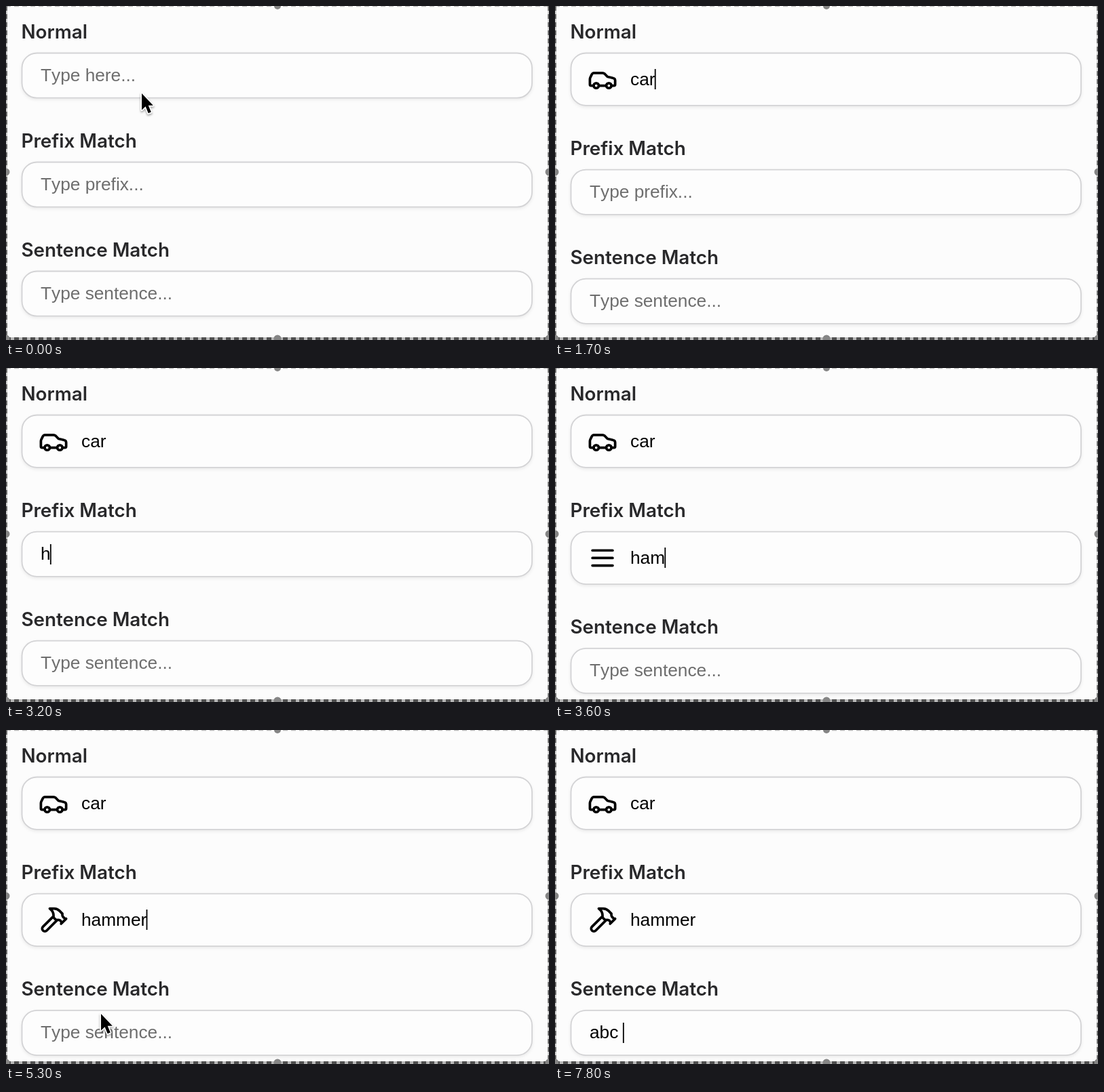
Animation, 800 px wide and 493 px high, one loop 8000 ms. Source, as an HTML page:

```html
<!DOCTYPE html>
<html lang="en">
<head>
<meta charset="utf-8">
<title>Icon inputs</title>
<style>
html, body { margin: 0; width: 100%; height: 100%; overflow: hidden; background: #fcfcfc; }
svg { display: block; width: 800px; height: 493px; }
.label { font: 600 27.8px Inter, "Open Sans", sans-serif; fill: #29292b; }
.value { font: 26.25px "Liberation Sans", Arial, sans-serif; font-kerning: none; white-space: pre; }
.box { fill: #fdfdfd; stroke: #d3d3d5; stroke-width: 1.8; filter: drop-shadow(0 2px 2px rgba(0, 0, 0, .07)); }
.icon { fill: none; stroke: #000; stroke-width: 2; stroke-linecap: round; stroke-linejoin: round; }
.edge { fill: none; stroke-dasharray: 7 5; }
#pointer { stroke: #fff; stroke-width: 3.4; paint-order: stroke; stroke-linejoin: round; filter: drop-shadow(0 2px 1.5px rgba(0, 0, 0, .35)); }
</style>
</head>
<body>
<svg viewBox="0 0 800 493">
  <g id="fields"></g>
  <rect id="caret" width="1.8" height="30"/>
  <path id="pointer" d="M0 0V24.5L5.6 19.3L9.7 29.3L13.8 27.6L9.7 17.8H16.8Z"/>
  <g id="frame">
    <path class="edge" d="M0 .5H800" stroke="#bcbcbc" stroke-width="1.4"/>
    <path d="M1 0V493M799.2 0V493" stroke="#c9c9c9" stroke-width="2"/>
    <path class="edge" d="M1 0V493M799.2 0V493" stroke="#666" stroke-width="2"/>
    <path d="M0 491H800" stroke="#b8b8b8" stroke-width="4"/>
    <path class="edge" d="M0 491H800" stroke="#505050" stroke-width="4"/>
    <g fill="#858585">
      <circle cx="400" r="5"/><circle cy="245" r="5.5"/><circle cx="800" cy="245" r="5.5"/>
      <circle cy="491" r="5.5"/><circle cx="400" cy="491" r="5.5"/><circle cx="800" cy="491" r="5.5"/>
    </g>
  </g>
</svg>
<script>
const LOOP = 8000, LEFT = 51;
const $ = id => document.getElementById(id);

const ICONS = {
  car: "M19 17h2c.6 0 1-.4 1-1v-3c0-.9-.7-1.7-1.5-1.9C18.7 10.6 16 10 16 10s-1.3-1.4-2.2-2.3c-.5-.4-1.1-.7-1.8-.7H5c-.6 0-1.1.4-1.4.9l-1.4 2.9A3.7 3.7 0 0 0 2 12v4c0 .6.4 1 1 1h2M9 17h6M5 17a2 2 0 1 0 4 0a2 2 0 1 0-4 0M15 17a2 2 0 1 0 4 0a2 2 0 1 0-4 0",
  menu: "M4 6h16M4 12h16M4 18h16",
  hammer: "m15 12-8.373 8.373a1 1 0 1 1-3-3L12 9M18 15l4-4M21.5 11.5l-1.914-1.914A2 2 0 0 1 19 8.172V7l-2.26-2.26a6 6 0 0 0-4.202-1.756L9 2.96l.92.82A6.18 6.18 0 0 1 12 8.4V10l2 2h2.172a2 2 0 0 1 1.414.586L18.5 14.5"
};

// Every track holds its value from the given time until the next entry.
const FIELDS = [
  { label: "Normal", hint: "Type here...", keys: [1100, 1400, 1700], word: "car", icons: [[1700, "car"]] },
  { label: "Prefix Match", hint: "Type prefix...", keys: [3200, 3300, 3600, 4100, 4600, 4900], word: "hammer",
    icons: [[3600, "menu"], [4200, "hammer"]] },
  { label: "Sentence Match", hint: "Type sentence...", keys: [6500, 6900, 7400, 7800], word: "abc ", icons: [] }
];
const CARET = [[600, 0], [1000, null], [1100, 0], [2200, null], [2600, 1], [3100, null], [3200, 1],
  [5400, null], [5700, 2], [6200, null], [6500, 2]];
const POINTER = [[0, [200, 129]], [200, [162, 44]], [600, [157, 109]], [1000, null],
  [2200, [205, 240]], [2300, [200, 252]], [2400, [194, 262]], [2500, [183, 271]], [2600, [175, 277]], [3100, null],
  [5200, [149, 400]], [5300, [140, 419]], [5400, [135, 430]], [5500, [131, 439]], [5600, [130, 443]],
  [5700, [130, 445]], [6500, null]];

const at = (track, t) => (track.filter(e => e[0] <= t).pop() || [0, null])[1];

for (const f of FIELDS) {
  const g = document.createElementNS("http://www.w3.org/2000/svg", "g");
  g.innerHTML = `<text class="label" x="22.5" y="48">${f.label}</text>
    <rect class="box" x="23.5" y="69.5" width="751.5" rx="22"/>
    <path class="icon"/><text class="value"></text>`;
  $("fields").append(g);
  f.group = g;
  [, f.box, f.icon, f.text] = g.children;
}

function draw(t) {
  const active = at(CARET, t);
  let top = 0;
  FIELDS.forEach((f, i) => {
    const typed = f.word.slice(0, f.keys.filter(k => k <= t).length);
    const icon = at(f.icons, t);
    const height = icon ? 77.4 : 66.2, mid = 69.5 + height / 2, x = icon ? 111 : LEFT;
    f.group.setAttribute("transform", `translate(0 ${top})`);
    f.box.setAttribute("height", height);
    f.icon.setAttribute("d", ICONS[icon] || "");
    f.icon.setAttribute("transform", `translate(47.7 ${mid - 22.3}) scale(1.86)`);
    f.text.textContent = typed || f.hint;
    f.text.setAttribute("x", x);
    f.text.setAttribute("y", Math.round(mid + 8.6));
    f.text.setAttribute("fill", typed ? "#000" : "#6e6e6e");
    if (i === active) {
      const width = typed ? f.text.getComputedTextLength() : 0.7;
      $("caret").setAttribute("x", x + width - 0.7);
      $("caret").setAttribute("y", Math.round(top + mid - 15.2));
    }
    top += height + 94.8;
  });
  $("caret").style.display = active === null ? "none" : "";

  const tip = at(POINTER, t);
  $("pointer").style.display = tip ? "" : "none";
  if (tip) $("pointer").setAttribute("transform", `translate(${tip})`);
}

const start = performance.now();
function tick() {
  draw((performance.now() - start) % LOOP);
  requestAnimationFrame(tick);
}
tick();
</script>
</body>
</html>
```
